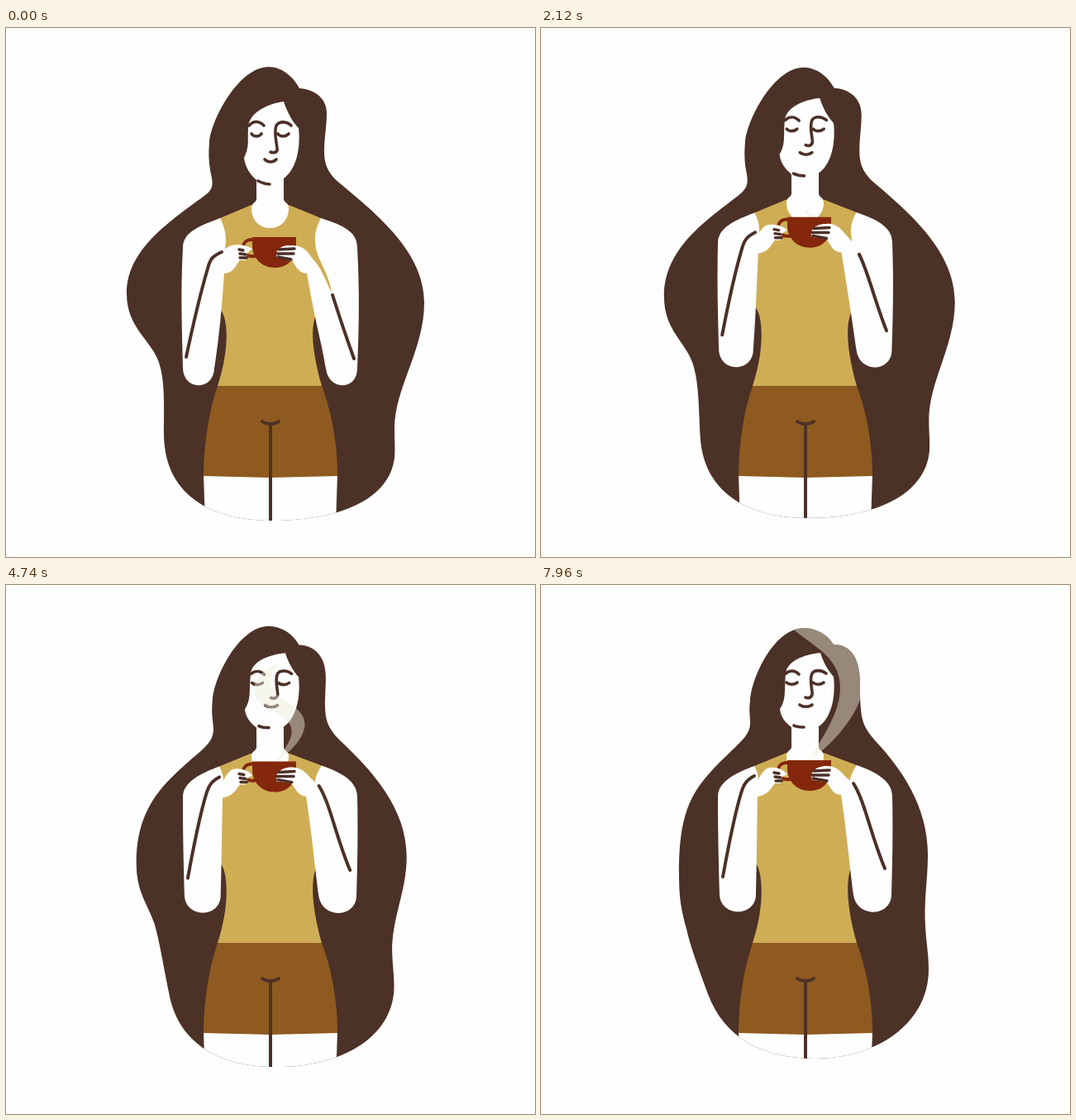
These frames come from a looping animation (640x640 px, 8 s). An HTML page with a canvas:

```html
<!DOCTYPE html>
<html lang="en">
<head>
<meta charset="utf-8">
<title>Coffee break</title>
<style>
html, body { margin: 0; width: 100%; height: 100%; overflow: hidden; background: #fefefe; }
canvas { display: block; }
</style>
</head>
<body>
<canvas id="stage" width="640" height="640"></canvas>
<script>
const ctx = document.getElementById('stage').getContext('2d');
const LOOP = 8000, STEP = 112;
const BROWN = '#4c3127', SKIN = '#fefefe', GOLD = '#cfad55', SHORTS = '#8e5a1f', RED = '#84270c';

// Each shape is a pair of poses: cup low, cup raised.
const hair = [
  `M318 47 C333 47 347 58 355 73 C372 74 388 84 388 103 C388 120 385 132 385 150
   C385 168 392 178 404 188 C450 226 506 272 506 332 C506 390 470 435 470 485
   C470 500 471 508 470 520 C464 570 404 596 322 596 C255 596 192 570 191 492
   C191 460 193 425 184 402 C174 376 146 362 146 321 C146 268 198 234 240 203
   C253 194 250 186 247 172 C245 160 245 150 246 138 C248 112 281 47 318 47Z`,
  `M318 52 C333 52 347 60 354 72 C376 72 386 90 386 118 C386 132 386 140 387 150
   C388 168 394 176 404 188 C436 222 468 268 468 326 C468 356 463 380 465 414
   C466 432 469 446 469 465 C469 531 405 573 332 573 C268 573 222 548 202 495
   C190 462 180 435 176 416 C170 394 167 380 167 350 C167 268 184 245 228 203
   C248 184 254 178 253 163 C252 152 252 148 253 140 C255 110 283 52 318 52Z`];
const tank = [
  'M297 214 L259 230 L250 262 L258 340 C268 346 272 385 256 433 L382 433 C370 390 368 362 376 344 L396 322 L384 250 L381 230 L342 214Z',
  'M297 203 L258 219 L250 255 L258 335 C268 342 272 385 256 433 L382 433 C370 390 368 357 376 340 L390 300 L385 240 L382 218 L342 203Z'];
const neck = [
  'M303 165 L303 207 C303 211 297 211 297 218 C297 250 342 250 342 218 C342 211 336 211 336 207 L336 165Z',
  'M303 160 L303 196 C303 200 297 200 297 207 C297 236 342 236 342 207 C342 200 336 200 336 196 L336 160Z'];
const face = [
  'M336 89 C341 104 347 114 354 121 C357 148 350 172 336 182 L303 184 C296 178 289 168 288 157 C295 143 292 135 293 120 C294 102 318 91 336 89Z',
  'M338 82 C342 95 348 104 354 111 C357 138 350 162 336 171 L303 172 C296 167 290 160 289 150 C297 138 294 128 296 108 C297 92 318 84 338 82Z'];
const features = [
  `M294 118 C299 112 306 112 312 118 M297 128 C300 132 306 132 309 128
   M345 118 C340 113 331 112 327 118 C324 125 327 138 328 145 C329 150 325 152 320 150
   M329 128 C332 132 338 132 342 128 M313 159 C317 163 323 163 327 159`,
  `M296 107 C301 103 307 103 312 108 M297 118 C300 121 306 121 310 118
   M345 107 C340 103 331 102 328 107 C325 113 327 122 328 129 C329 135 325 138 320 136
   M329 118 C332 121 338 121 342 118 M313 145 C317 148 324 148 328 145`];
const chin = ['M305 185 C309 187 314 189 319 189', 'M306 170 C310 172 314 172 318 172'];
const leftArm = [
  `M259 230 C236 239 214 246 214 266 C211 320 213 365 214 412 C215 439 251 439 252 412
   C256 385 260 355 264 297 C276 296 277 288 283 281 L290 281 L292 272 L298 267
   C290 262 278 261 270 264 C267 266 265 267 265 268 C268 252 264 240 259 230Z`,
  `M258 219 C236 227 214 238 214 256 C214 300 215 340 216 375 C218 402 259 402 260 375
   C261 345 261 300 262 256 C276 253 277 247 283 240 L290 240 L292 232 L298 229
   C292 222 282 219 273 222 C268 226 264 232 263 236 C263 230 261 224 258 219Z`];
const rightArm = [
  `M381 230 C408 239 425 246 425 266 C428 320 427 365 425 412 C425 439 390 439 387 412
   C382 380 376 365 364 297 C352 296 350 286 345 279 L328 278 C324 270 332 262 345 263
   C360 262 366 272 370 278 C382 290 386 305 394 320 C392 305 384 290 379 279 C374 266 370 250 381 230Z`,
  `M382 218 C408 227 425 238 425 256 C426 300 425 340 424 375 C423 402 382 403 378 375
   C374 345 370 300 363 254 C353 254 351 245 345 238 L328 236 C324 228 332 219 345 219
   C360 218 366 231 371 234 C373 236 375 238 376 239 C368 239 368 237 374 238 C374 232 377 225 382 218Z`];
const armLines = [
  'M261 271 C250 276 247 279 244 291 C234 325 225 365 218 398 M395 323 C402 345 412 375 421 400',
  'M258 231 C248 236 245 242 242 252 C233 282 226 320 220 353 M378 240 C392 262 398 300 416 343'];
const fingers = [
  'M282 268 L287 269 M283 273 L290 274 M283 278 L291 278 M330 268 L349 267 M328 273 L348 273 M329 277 L345 280',
  'M282 227 L288 228 M283 232 L290 233 M284 237 L291 237 M330 225 L349 224 M328 230 L348 230 M329 234 L346 237'];

// Steam ribbon: foot, right outer, left inner, tip, left outer, right inner.
const steamTimes = [1800, 2680, 3800, 5720, 6840, 7960];
const steamKeys = [
  [325, 242, 327, 240, 325, 240, 325, 239, 323, 240, 325, 241],
  [322, 224, 344, 209, 318, 193, 327, 182, 310, 195, 334, 211],
  [324, 217, 353, 187, 321, 152, 330, 134, 306, 156, 340, 192],
  [323, 213, 371, 148, 319, 75, 331, 52, 294, 95, 352, 160],
  [323, 213, 382, 125, 320, 40, 330, 10, 284, 50, 358, 142],
  [323, 213, 391, 115, 335, -10, 330, -25, 284, 10, 362, 124]];
const nodTimes = [0, 1560, 2680, 3800, 5720, 6840, 8000];
const nodKeys = [[0], [-2], [2.5], [1.5], [-.5], [0], [0]];

const lerp = (a, b, p) => a + (b - a) * p;

function morph([a, b], p) {
  const ends = b.match(/-?\d+/g);
  let i = 0;
  return new Path2D(a.replace(/-?\d+/g, n => lerp(+n, +ends[i++], p).toFixed(2)));
}

function keyed(times, keys, t) {
  let i = 0;
  while (i < times.length - 2 && t > times[i + 1]) i++;
  const p = Math.min(1, (t - times[i]) / (times[i + 1] - times[i]));
  return keys[i].map((v, k) => lerp(v, keys[i + 1][k], p));
}

// cubic-bezier(.25, .1, .25, 1)
function ease(x) {
  if (x >= 1) return 1;
  let lo = 0, hi = 1, s = 0;
  for (let i = 0; i < 24; i++) {
    s = (lo + hi) / 2;
    if (.75 * s * (1 - s) + s ** 3 < x) lo = s; else hi = s;
  }
  return .3 * s * (1 - s) ** 2 + 3 * s * s * (1 - s) + s ** 3;
}

const swing = t => (1 - Math.cos(Math.PI * t / 8900)) / 2;

function fill(path, color) {
  ctx.fillStyle = color;
  ctx.fill(path);
}

function line(path, width, color = BROWN) {
  ctx.strokeStyle = color;
  ctx.lineWidth = width;
  ctx.stroke(path);
}

function steam(t) {
  const [fx, fy, rx, ry, lx, ly, tx, ty, ox, oy, ix, iy] = keyed(steamTimes, steamKeys, t);
  const p = new Path2D(), m1 = (ry + ly) / 2, m2 = (oy + iy) / 2;
  p.moveTo(fx, fy);
  p.bezierCurveTo(lerp(fx, rx, .5), lerp(fy, ry, .22), rx, lerp(ry, fy, .34), rx, ry);
  p.bezierCurveTo(rx, m1, lx, m1, lx, ly);
  p.quadraticCurveTo(lx, (ly + ty) / 2, tx, ty);
  p.quadraticCurveTo(ox, lerp(ty, oy, .3), ox, oy);
  p.bezierCurveTo(ox, m2, ix, m2, ix, iy);
  p.bezierCurveTo(ix, lerp(iy, fy, .32), lerp(fx, ix, .5), lerp(fy, iy, .34), fx, fy);
  fill(p, 'rgba(236,235,216,.465)');
}

const legs = new Path2D('M239 540 L241 600 H399 L401 540Z');
const shorts = new Path2D('M256 433 H382 C396 470 401 510 401 542 L320 544 L239 542 C239 505 245 465 256 433Z');
const seam = new Path2D('M310 476 C315 480 325 480 330 476 M320 479 V610');
const cup = new Path2D('M298 253 H351 V263 C351 280 340 290 325 290 C310 290 298 279 298 263Z');
const handle = new Path2D('M300 256 C290 255 286 261 287 268 C288 274 292 277 301 276');

function draw(t) {
  const e = ease(t / 6200);
  const outline = morph(hair, swing(t) / swing(7960));
  ctx.fillStyle = SKIN;
  ctx.fillRect(0, 0, 640, 640);
  ctx.save();
  ctx.lineCap = ctx.lineJoin = 'round';
  fill(outline, BROWN);
  ctx.clip(outline);

  fill(legs, SKIN);
  fill(shorts, SHORTS);
  line(seam, 4);
  fill(morph(tank, e), GOLD);
  fill(morph(neck, e), SKIN);
  fill(morph(face, e), SKIN);
  line(morph(chin, e), 3.6);
  ctx.save();
  ctx.translate(keyed(nodTimes, nodKeys, t)[0], 0);
  line(morph(features, e), 3.6);
  ctx.restore();
  if (t > steamTimes[0]) steam(t);

  ctx.translate(0, -41 * e);
  line(handle, 4, RED);
  ctx.translate(0, 41 * e);
  fill(morph(leftArm, e), SKIN);
  ctx.translate(0, -41 * e);
  fill(cup, RED);
  ctx.translate(0, 41 * e);
  fill(morph(rightArm, e), SKIN);
  line(morph(armLines, e), 4);
  line(morph(fingers, e), 3.4);
  ctx.restore();
}

const start = performance.now();
function tick() {
  const t = (performance.now() - start) % LOOP;
  draw(Math.floor((t + 8) / STEP) * STEP);
  requestAnimationFrame(tick);
}
tick();
</script>
</body>
</html>
```
